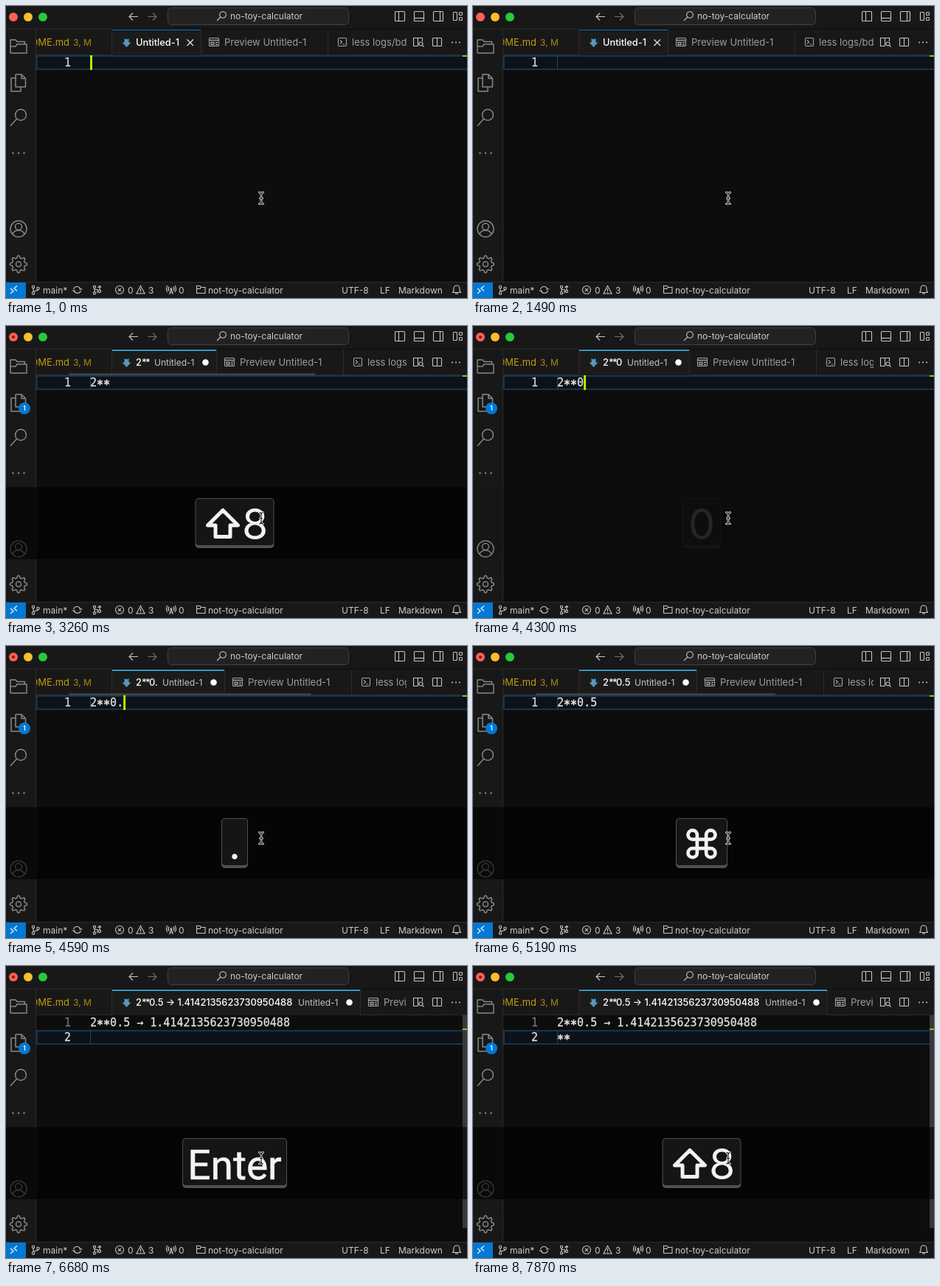
These frames come from a looping animation (625 px wide and 397 px high, 8 s). An HTML page:

```html
<!DOCTYPE html>
<html lang="en">
<head>
<meta charset="utf-8">
<title>Inline calculator</title>
<style>
  html, body { margin: 0; width: 100%; height: 100%; overflow: hidden; background: #0d0d0d; }
  svg { display: block; }
  text { font-family: Inter, "Open Sans", sans-serif; font-size: 12px; fill: #ccc; white-space: pre; }
  .tab { font-size: 13px; fill: #9d9d9d; }
  .title { font-size: 12.8px; font-weight: 500; fill: #fff; }
  .title .star { letter-spacing: -1.6px; }
  .code { font: 15px "DejaVu Sans Mono", monospace; fill: #dedede; stroke: #dedede; stroke-width: .3; }
  .code .star { font-weight: bold; }
  .key text { font: 57px Inter, sans-serif; fill: #f2f2f2; text-anchor: middle; }
  .key .word { font: 55px Roboto, sans-serif; stroke: #f2f2f2; stroke-width: .6; }
  .line { fill: none; stroke: #c5c5c5; stroke-width: 1.1; }
  .side { fill: none; stroke: #868686; stroke-width: 1.5; stroke-linejoin: round; }
  .glyph { fill: none; stroke: #f2f2f2; stroke-linejoin: round; }
</style>
</head>
<body>
<svg width="625" height="397" viewBox="0 0 625 397">
  <defs>
    <clipPath id="tabClip"><rect x="41" y="32" width="502" height="36"/></clipPath>
    <g id="lens"><circle cx="2" cy="-2" r="4.3"/><path d="M-1.2 1.2L-6 6"/></g>
    <rect id="pane" x="-6.500" y="-6.500" width="13" height="13" rx="1"/>
    <path id="beam" d="M343.500 253.500Q346 253.500 346 256.500Q346 253.500 348.500 253.500M346 256V266M343.500 269Q346 269 346 266Q346 269 348.500 269M344.500 261.500h3"/>
  </defs>

  <rect width="625" height="397" fill="#0d0d0d"/>

  <!-- Editor -->
  <rect id="current" x="42" width="590" height="18" fill="#0c1218" stroke="#17344e" stroke-width="2"/>
  <path id="guide" d="M114.500 0V20" stroke="#1b4363"/>
  <text id="num1" class="code" x="88" y="82" text-anchor="end">1</text>
  <text id="num2" class="code" x="88" y="102" text-anchor="end">2</text>
  <text id="row1" class="code" x="114" y="82"></text>
  <text id="row2" class="code" x="114" y="102"></text>
  <rect id="caret" width="3" height="20" fill="#b4f000"/>
  <rect id="slider" x="619" y="67" width="6" height="289" fill="#393939"/>
  <rect id="mark" x="619" width="6" height="2" fill="#94c219"/>

  <!-- Tabs -->
  <rect x="41" y="32" width="584" height="35" fill="#181818"/>
  <path d="M41 66.500H625" stroke="#2b2b2b"/>
  <g clip-path="url(#tabClip)">
    <text class="tab" x="86" y="54" text-anchor="end" style="fill:#c39c0e">README.md</text>
    <text x="91" y="54" style="fill:#ab8a0f">3, M</text>
    <rect id="active" x="144" y="32" height="35" fill="#1b1b1b"/>
    <rect id="accent" x="144" y="32"/>
    <path d="M143.500 32V67" stroke="#2b2b2b"/>
    <path d="M160.500 44L163.500 45.500L166.500 44V49.500H169.500L163.500 56L157.500 49.500H160.500Z" fill="#519aba"/>
    <text id="title" class="title" x="176" y="54"></text>
    <g id="after">
      <text id="desc" x="-84" y="54" style="fill:#c4c4c4">Untitled-1</text>
      <circle id="dirty" cx="-14.500" cy="49.500" r="4.300" fill="#fff"/>
      <path id="close" d="M-18.500 45.500l8.500 8.500m0-8.500l-8.500 8.500" stroke="#e2e2e2" stroke-width="1.300"/>
      <path d="M.5 32V67M172.500 32V67" stroke="#2b2b2b"/>
      <g class="line" style="stroke:#a2a2a2">
        <rect x="11.500" y="43.500" width="13" height="11" rx="1"/>
        <path d="M12 46.500H25M14 49.500H18V52.500H14ZM20 49.500H23M20 52.500H23" stroke-width="1.300"/>
        <rect x="186.500" y="43.500" width="11" height="11" rx="1.500"/>
        <path d="M189 46.500l2.500 2.500-2.500 2.500M192.500 52h3"/>
      </g>
      <text class="tab" x="32" y="54">Preview Untitled-1</text>
      <text class="tab" x="205" y="54">less logs/bdlog</text>
    </g>
    <rect id="scroll" x="85" y="64.500" height="2.500" fill="#454545"/>
  </g>
  <g class="line">
    <path d="M558 54.500H552.500V43.500H564.500V48M558.500 43.500V54.500"/>
    <circle cx="562.500" cy="51.500" r="2.500"/><path d="M564.300 53.300l2.200 2.200"/>
    <rect x="578.500" y="43.500" width="12" height="11" rx="1"/><path d="M584.500 43.500V54.500"/>
  </g>
  <path d="M605 49.500h.01M610 49.500h.01M615 49.500h.01" stroke="#c5c5c5" stroke-width="2" stroke-linecap="round"/>

  <!-- Title bar -->
  <rect width="625" height="31" fill="#181818"/>
  <path d="M0 31.500H143.500" stroke="#2b2b2b"/>
  <circle cx="10" cy="15" r="6" fill="#ff5f57"/>
  <circle id="unsaved" cx="10" cy="15" r="2" fill="#7e1712"/>
  <circle cx="30" cy="15" r="6" fill="#febc2e"/>
  <circle cx="50" cy="15" r="6" fill="#28c840"/>
  <path class="line" d="M179 14.500H167M172 9.500l-5 5 5 5"/>
  <path class="line" d="M192 14.500H204M199 9.500l5 5-5 5" style="stroke:#707070"/>
  <rect x="219.500" y="2.500" width="245" height="23" rx="5" fill="#222" stroke="#414141"/>
  <use href="#lens" class="line" x="292" y="14"/>
  <text x="304" y="18">no-toy-calculator</text>
  <g class="line">
    <use href="#pane" x="534" y="14"/><path d="M532.500 8V20"/>
    <use href="#pane" x="560" y="14"/><path d="M554 16.500H566"/>
    <use href="#pane" x="586" y="14"/><path d="M588.500 8V20"/>
    <rect x="606.500" y="8.500" width="5" height="11" rx="1"/>
    <rect x="614.500" y="8.500" width="4" height="4" rx="1"/><rect x="614.500" y="15.500" width="4" height="4" rx="1"/>
  </g>

  <!-- Activity bar -->
  <rect y="32" width="40" height="344" fill="#181818"/>
  <path d="M40.500 32V376" stroke="#2b2b2b"/>
  <g class="side">
    <path d="M6 64V46H13L15 48.500H25.500V52M6 55H13L15 52H28V64H6"/>
    <path d="M13 93H21L26.500 98.500V110H13ZM21 93V98.500H26.500M13 98H7V116H20V110"/>
    <circle cx="20" cy="148" r="7.500"/><path d="M14.500 153.500L6 163"/>
    <circle cx="17" cy="303" r="11"/><circle cx="17" cy="300" r="4.500"/><path d="M9 310.500C11 303 23 303 25 310.500"/>
    <path id="gear"/><circle cx="17" cy="351" r="3.500"/>
  </g>
  <path d="M9.500 200h.01M17 200h.01M24.500 200h.01" stroke="#868686" stroke-width="2.500" stroke-linecap="round"/>
  <g id="badge">
    <circle cx="25" cy="112" r="8" fill="#0078d4"/>
    <text x="25" y="115.300" text-anchor="middle" style="font-size:9px;font-weight:600;fill:#fff">1</text>
  </g>

  <!-- Status bar -->
  <rect y="376" width="625" height="21" fill="#181818"/>
  <path d="M0 375.500H625" stroke="#2b2b2b"/>
  <rect y="376" width="27" height="21" fill="#0078d4"/>
  <path class="line" d="M6 384l4 3.500-4 3.500M15 380.500l-4 3.500 4 3.500" style="stroke:#fff"/>
  <g class="line">
    <circle cx="37" cy="382" r="1.700"/><circle cx="43.500" cy="384" r="1.700"/><circle cx="37" cy="390.500" r="1.700"/>
    <path d="M37 383.700V388.800M43.500 385.700C43.500 388 37 386.500 37 388.800"/>
    <path d="M91.500 385a5 5 0 0 1 9.500 0M101.500 387a5 5 0 0 1-9.500 0M99 385h4.500M89.500 387h4.500"/>
    <circle cx="120" cy="382" r="1.600"/><circle cx="120" cy="390.500" r="1.600"/><circle cx="127" cy="388" r="1.600"/>
    <path d="M120 383.600V388.900M120 385.500H124V390.500M127 386.400V380.500M124.500 383l2.500-2.500 2 2"/>
    <circle cx="154" cy="386" r="5.500"/><path d="M151.800 383.800l4.400 4.400m0-4.400l-4.400 4.400"/>
    <path d="M182.500 380.500L188 391H177ZM182.500 384V388M182.500 389v1"/>
    <path d="M224 385L221.500 392M224 385L226.500 392M222.500 389.500h3M221 381.500q-2 3 0 6M227 381.500q2 3 0 6M219 380q-3 4.500 0 9M229 380q3 4.500 0 9"/>
    <circle cx="224" cy="384.500" r="1"/>
    <path d="M258.500 390.500V380.500H263L264.500 382.500H270V390.500ZM258.500 384.500H263L264.500 382.500"/>
    <path d="M605.500 389.500H616.500L615 387V384a4 4 0 0 0-8 0V387ZM609.500 390a1.500 1.500 0 0 0 3 0"/>
  </g>
  <g id="status"></g>

  <!-- Keystroke overlay -->
  <g id="overlay">
    <rect y="219" width="625" height="98" fill="#000" opacity=".62"/>
    <g id="key" class="key"></g>
  </g>

  <!-- Pointer -->
  <g fill="none" stroke-linecap="round">
    <use href="#beam" stroke="#fff" stroke-width="2.700"/>
    <use href="#beam" stroke="#111" stroke-width="1.100"/>
  </g>
</svg>
<script>
const LOOP = 8000;
const CHAR = 9.03;
const RESULT = '2**0.5 → 1.4142135623730950488';

// Right edge of the active tab for each title
const EDGE = { '': 264, '2': 273, '2*': 279, '2**': 285, '2**0': 293, '2**0.': 296, '2**0.5': 303, [RESULT]: 480 };

// Each step changes only the listed properties
const steps = [
  [0, { row1: '', row2: null, caret: 1, keys: [], show: 0, scroll: 0 }],
  [450, { caret: 0 }],
  [890, { caret: 1 }],
  [1490, { caret: 0 }],
  [1930, { row1: '2', caret: 1, keys: ['2'], show: .1, scroll: 1 }],
  [2080, { show: .45 }],
  [2230, { show: 1 }],
  [2380, { keys: ['⇧'] }],
  [2520, { row1: '2*', keys: ['⇧', '8'] }],
  [2820, { row1: '2**' }],
  [3260, { caret: 0 }],
  [3560, { caret: 1, show: 0, scroll: .5 }],
  [3850, { caret: 0, scroll: 0 }],
  [4300, { row1: '2**0', caret: 1, keys: ['0'], show: .1 }],
  [4440, { show: .5, scroll: 1 }],
  [4590, { row1: '2**0.', keys: ['.'], show: 1 }],
  [4740, { row1: '2**0.5', keys: ['5'] }],
  [5190, { caret: 0, keys: ['⌘'] }],
  [5330, { row1: RESULT, caret: 1, keys: ['⌘', 'Enter'] }],
  [5780, { caret: 0 }],
  [6080, { caret: 1, show: 0 }],
  [6230, { row2: '', keys: ['Enter'], show: 1 }],
  [6530, { scroll: 0 }],
  [6680, { caret: 0 }],
  [6970, { keys: ['⇧'] }],
  [7120, { row2: '*', caret: 1, keys: ['⇧', '8'] }],
  [7420, { row2: '**' }],
  [7870, { caret: 0 }],
];
let last = {};
const states = steps.map(([at, change]) => last = { ...last, ...change, at });

const $ = id => document.getElementById(id);
const set = (id, attrs) => { for (const k in attrs) $(id).setAttribute(k, attrs[k]); };
const visible = (id, on) => { $(id).style.display = on ? '' : 'none'; };

// Lowers a run of asterisks and returns to the baseline after it
const stars = (text, drop) => text.replace(/(\*+)(.?)/,
  `<tspan class="star" dy="${drop}">$1</tspan><tspan dy="${-drop}">$2</tspan>`);

const keyWidth = { '⇧': 55, '⌘': 50, '.': 16, Enter: 122 };
const glyphs = {
  '⇧': '<path class="glyph" stroke-width="5" d="M0-18.500L20.500 2H10V17.500H-10V2H-20.500Z"/>',
  '⌘': '<path class="glyph" stroke-width="2.300" transform="scale(2.050) translate(-12 -12)" d="M18 3a3 3 0 0 0-3 3v12a3 3 0 1 0 3-3H6a3 3 0 1 0 3 3V6a3 3 0 1 0-3 3h12a3 3 0 1 0 0-6z"/>',
};

function keyMarkup(keys) {
  const widths = keys.map(k => keyWidth[k] || 32);
  const w = widths.reduce((a, b) => a + b, 20);
  let x = 310 - w / 2;
  let out = `<rect x="${x}" y="234" width="${w}" height="68" rx="5" fill="#505050"/>
    <rect x="${x + 1}" y="235" width="${w - 2}" height="63" rx="4" fill="#151515"/>`;
  x += 10;
  keys.forEach((k, i) => {
    const mid = x + widths[i] / 2;
    const face = glyphs[k] || `<text class="${k.length > 1 ? 'word' : ''}" y="20.500">${k}</text>`;
    out += `<g transform="translate(${mid} 269)">${face}</g>`;
    x += widths[i];
  });
  return out;
}

function draw(s) {
  const edge = EDGE[s.row1];
  const changed = s.row1 !== '';
  const second = s.row2 !== null;
  const top = second ? 87 : 67;
  const typed = second ? s.row2 : s.row1;

  $('row1').innerHTML = stars(s.row1, 3);
  $('row2').innerHTML = stars(s.row2 || '', 3);
  $('num1').style.fill = $('num1').style.stroke = second ? '#6e7681' : '#d6d6d6';
  visible('num2', second);
  visible('slider', second);
  set('current', { y: top + 1 });
  set('guide', { transform: `translate(0 ${top})` });
  set('caret', { x: 114 + typed.length * CHAR, y: top });
  visible('caret', s.caret);
  set('mark', { y: second ? 85 : 67 });

  $('title').innerHTML = stars(s.row1 || 'Untitled-1', 0);
  set('active', { width: edge - 144 });
  set('accent', { width: edge - 144, height: changed ? 2 : 1, fill: changed ? '#3399cc' : '#0078d4' });
  set('after', { transform: `translate(${edge} 0)` });
  for (const id of ['desc', 'dirty', 'unsaved', 'badge']) visible(id, changed);
  visible('close', !changed);
  set('scroll', { width: 340 - (edge - 273) / 2, opacity: s.scroll });

  $('key').innerHTML = s.keys.length ? keyMarkup(s.keys) : '';
  set('overlay', { opacity: s.show });
}

const labels = [[50, 'main*'], [165, '0'], [193, '3'], [234, '0'], [274, 'not-toy-calculator'],
  [455, 'UTF-8'], [507, 'LF'], [532, 'Markdown']];
$('status').innerHTML = labels.map(([x, t]) => `<text x="${x}" y="390.500">${t}</text>`).join('');

// Eight teeth, four corners each
const teeth = Array.from({ length: 32 }, (_, i) => {
  const a = (i - 1.5) * Math.PI / 16;
  const r = i % 4 === 1 || i % 4 === 2 ? 11.5 : 8.5;
  return `${(17 + r * Math.cos(a)).toFixed(1)} ${(351 + r * Math.sin(a)).toFixed(1)}`;
});
set('gear', { d: `M${teeth.join('L')}Z` });

const start = performance.now();
let shown;
function tick() {
  const t = (performance.now() - start) % LOOP;
  const state = states.findLast(s => s.at <= t);
  if (state !== shown) draw(shown = state);
  requestAnimationFrame(tick);
}
tick();
</script>
</body>
</html>
```
